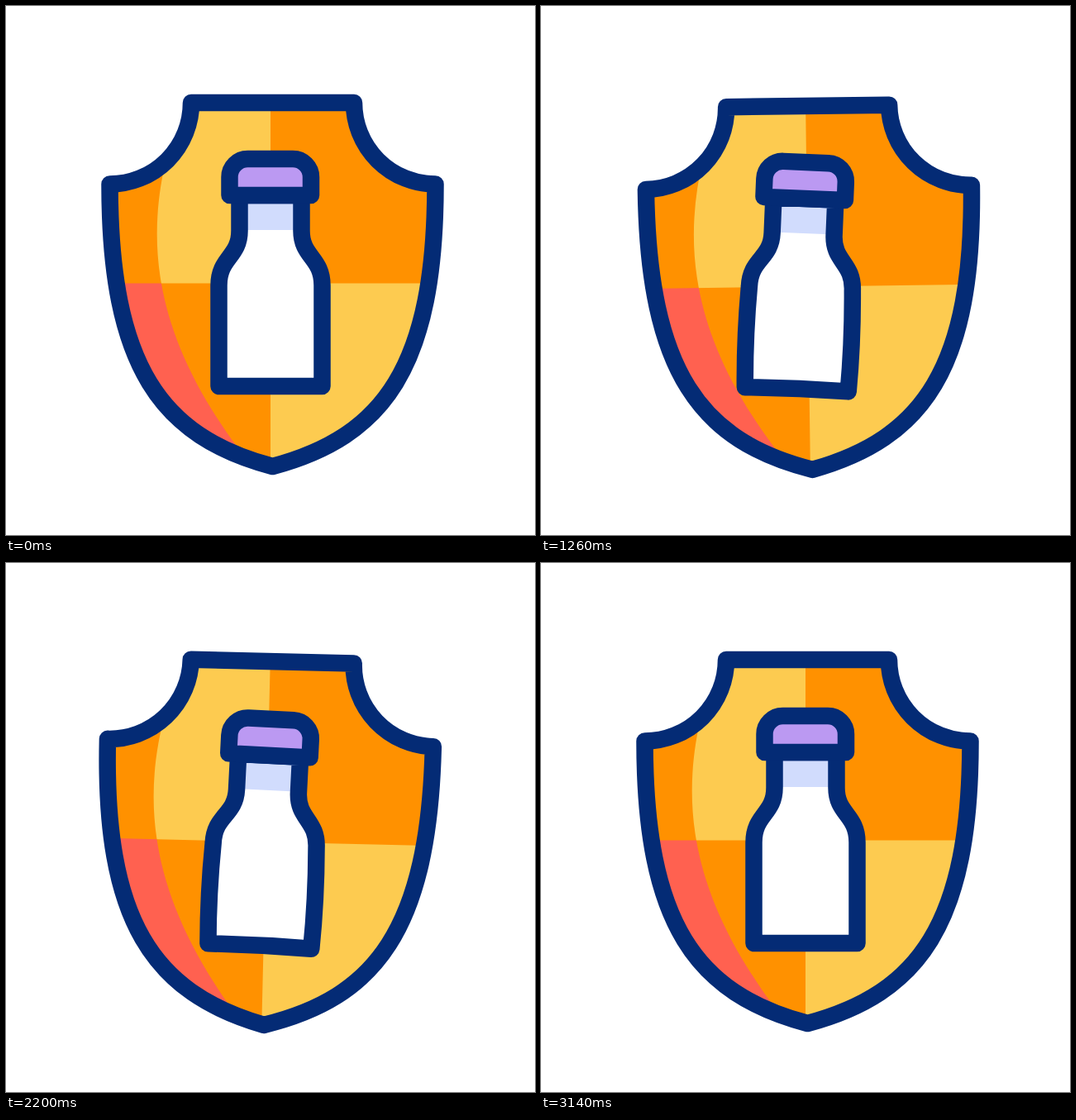
Write an HTML page that moves like this. It is 640 by 640 pixels and loops after 3.2 s.

```html
<!DOCTYPE html>
<html lang="en">
<head>
<meta charset="utf-8">
<title>Shield and bottle</title>
<style>
  html, body { margin: 0; width: 100%; height: 100%; overflow: hidden; background: #fff; }
  svg { display: block; width: 100%; height: 100%; }
  .line { stroke: #042b75; stroke-width: 20.5; stroke-linejoin: round; }
</style>
</head>
<body>
<svg viewBox="0 0 640 640">
  <defs>
    <path id="outline" d="M224 117H421A98.5 98.5 0 0 0 519.5 215.5C519.5 437 457 521 322.5 557C188 521 125.5 437 125.5 215.5A98.5 98.5 0 0 0 224 117Z"/>
    <path id="shade" d="M100 180H195C169 285 178 398 283 538H100Z"/>
    <clipPath id="inside"><use href="#outline"/></clipPath>
    <clipPath id="lower"><path d="M0 335.5H640V640H0Z"/></clipPath>
  </defs>
  <g id="shield">
    <g clip-path="url(#inside)">
      <path fill="#ff9100" d="M100 100H540V570H100Z"/>
      <path fill="#fdcb50" d="M100 100H320V335.5H100ZM320 335.5H540V570H320Z"/>
      <use href="#shade" fill="#ff9100"/>
      <g clip-path="url(#lower)"><use href="#shade" fill="#ff6150"/></g>
    </g>
    <use href="#outline" class="line" fill="none"/>
  </g>
  <g id="bottle">
    <path class="body" fill="#fff"/>
    <path fill="#d1dcfd" d="M282.5 229H357.5V271H282.5Z"/>
    <path class="body line" fill="none"/>
    <path class="line" fill="#bb99f2" d="M270.5 229V207A22 22 0 0 1 292.5 185H347A22 22 0 0 1 369 207V229Z"/>
  </g>
</svg>
<script>
const LOOP = 3200, STEP = 20, PERIOD = 1080;
const shield = document.getElementById('shield');
const bottle = document.getElementById('bottle');
const bodies = document.querySelectorAll('.body');

const progress = (t, from, to) => Math.min(1, Math.max(0, (t - from) / (to - from)));
const ease = (t, from, to) => (1 - Math.cos(Math.PI * progress(t, from, to))) / 2;
const bump = (t, from, peak, to) => ease(t, from, peak) - ease(t, peak, to);

// Fades all movement in after the rest and out before the loop ends.
const activity = t => bump(t, 180, 420, 420) + ease(t, 420, 420.01) - ease(t, 2660, 3120);
const active = t => ease(t, 180, 420) - ease(t, 2660, 3120);

// A cosine that comes to rest in its second trough.
const sway = (t, peak) => Math.cos(2 * Math.PI * Math.min(t - peak, 1.5 * PERIOD) / PERIOD);

// One full turn with a very steep middle.
function spin(t) {
  const u = 2 * progress(t, 2660, 3140) - 1;
  return -180 * (1 + Math.sign(u) * (1 - (1 - Math.abs(u)) ** 6));
}

// The body bulges while moving and its base bows as it rises.
function bodyPath(bulge, bow) {
  return `M282.5 229V272C282.5 304 257.5 304 257.5 338` +
    `Q${257.5 - bulge} 400 257.5 460Q320 ${460 + bow} 382.5 460` +
    `Q${382.5 + bulge} 400 382.5 338C382.5 304 357.5 304 357.5 272V229Z`;
}

function draw(t) {
  const move = active(t);
  const shieldY = -move * (15.7 + 20.5 * sway(t, 670));
  const shieldTilt = move * (3.05 + 4 * sway(t, 775));
  shield.setAttribute('transform',
    `translate(0 ${shieldY}) rotate(${shieldTilt} 322.5 106) rotate(${spin(t)} 321.5 313)`);

  // The bottle makes three hops and two leans.
  const bottleY = 4 * move - 28 * bump(t, 180, 740, 1260)
    - 23 * bump(t, 1260, 1740, 2220) - 18 * bump(t, 2220, 2700, 3120);
  const bottleTilt = 8.3 * bump(t, 300, 870, 1480) + 6.9 * bump(t, 1920, 2540, 3100);
  bottle.setAttribute('transform', `translate(0 ${bottleY}) rotate(${bottleTilt} 320 203)`);
  bodies.forEach(body => body.setAttribute('d', bodyPath(3 * move, -.45 * bottleY)));
}

const start = performance.now();
function frame() {
  const t = (performance.now() - start) % LOOP;
  draw(Math.floor(t / STEP) * STEP);
  requestAnimationFrame(frame);
}
frame();
</script>
</body>
</html>
```
